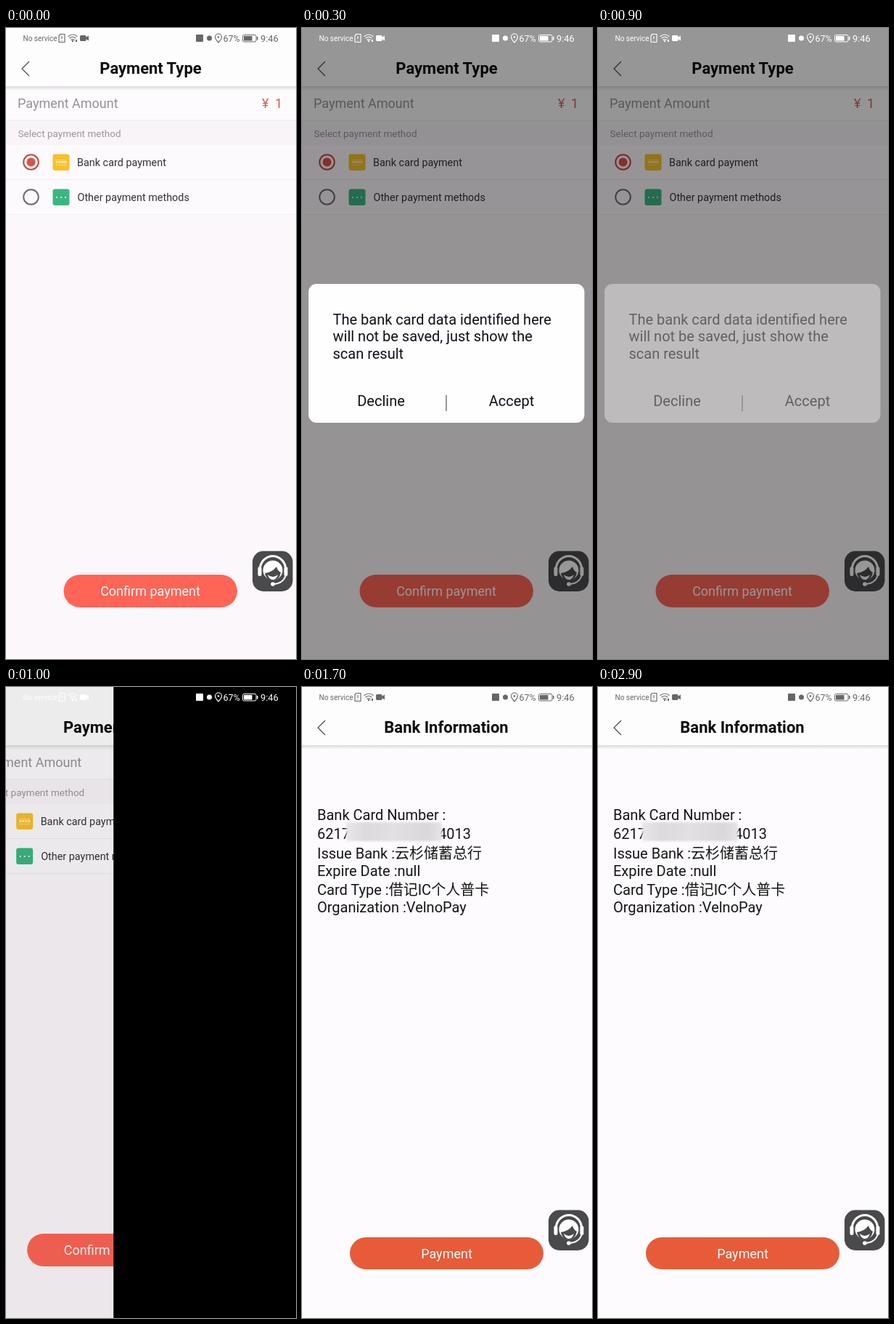
Recreate the animation shown at these times as an HTML page. Size 400 by 868 pixels, loop 3000 ms.

```html
<!DOCTYPE html>
<html lang="en">
<head>
<meta charset="utf-8">
<title>Bank card payment</title>
<style>
  html, body { margin: 0; width: 100%; height: 100%; overflow: hidden; background: #000; }
  svg { display: block; width: 100vw; height: 100vh; font-family: Roboto, "Noto Sans CJK SC", "Noto Sans CJK", sans-serif; }
  text { white-space: pre; }
  .mid { text-anchor: middle; }
  .title { font-size: 22px; font-weight: 700; fill: #0b0b0b; }
  .row { font-size: 14.4px; fill: #333135; }
  .big { font-size: 20px; fill: #111; }
  .info { font-size: 20px; fill: #151515; }
  .button { font-size: 18px; fill: #fff; }
  .line { fill: none; stroke-linecap: round; stroke-linejoin: round; }
</style>
</head>
<body>
<svg viewBox="0 0 400 868" preserveAspectRatio="none">
  <defs>
    <linearGradient id="fade" x2="0" y2="1">
      <stop offset="0" stop-color="#000" stop-opacity=".13"/>
      <stop offset="1" stop-color="#000" stop-opacity="0"/>
    </linearGradient>
    <linearGradient id="smudge">
      <stop offset="0" stop-color="#e9e7ea"/>
      <stop offset=".2" stop-color="#dbd9dc"/>
      <stop offset=".5" stop-color="#e2e0e3"/>
      <stop offset=".85" stop-color="#d9d7da"/>
      <stop offset="1" stop-color="#e6e4e7"/>
    </linearGradient>
    <filter id="soft"><feGaussianBlur stdDeviation="1.5"/></filter>
    <g id="header">
      <rect y="80" width="400" height="6" fill="url(#fade)"/>
      <rect width="400" height="80" fill="#fefdfe"/>
      <path class="line" d="M31.500 46.500L22 56L31.500 65.500" stroke="#4a4a4a" stroke-width="1.300"/>
    </g>
    <g id="support">
      <rect x="340" y="719.500" width="55.500" height="55.500" rx="15" fill="#4a494b"/>
      <path class="line" d="M350.500 744A17.500 17.500 0 0 1 385.500 744" stroke="#fff" stroke-width="3"/>
      <rect x="347.500" y="741" width="5" height="13" rx="2.500" fill="#fff"/>
      <rect x="383.500" y="741" width="5" height="13" rx="2.500" fill="#fff"/>
      <circle cx="368" cy="746" r="13.500" fill="#fff"/>
      <path d="M357 750Q367 749 373 741Q375 747 379 749Q377 760 368 760Q359 760 357 750Z" fill="#4a494b"/>
      <path d="M361 752Q368 758 375 752Q373 759 368 759Q363 759 361 752Z" fill="#fff"/>
      <path class="line" d="M385.500 754Q382 764 369 765" stroke="#fff" stroke-width="2"/>
      <circle cx="368" cy="765" r="2.800" fill="#fff"/>
    </g>
  </defs>

  <g id="payment">
    <rect width="400" height="868" fill="#fcf7fb"/>
    <rect y="80" width="400" height="47" fill="#fdfbfd"/>
    <rect y="127" width="400" height="34" fill="#f8f4f8"/>
    <rect y="161" width="400" height="95" fill="#fdfafd"/>
    <path d="M0 127H400M0 208.500H400M0 256.500H400" stroke="#efebef"/>
    <use href="#header"/>
    <text class="title mid" x="199.500" y="63">Payment Type</text>
    <text x="16" y="110" font-size="18" fill="#949295">Payment Amount</text>
    <g font-size="18" fill="#d75c4d"><text x="353" y="110">¥</text><text x="371" y="110">1</text></g>
    <text x="16.500" y="150" font-size="13.500" fill="#9a979b">Select payment method</text>
    <circle cx="34.500" cy="184.500" r="10.300" fill="none" stroke="#c4473f" stroke-width="2"/>
    <circle cx="34.500" cy="184.500" r="6" fill="#dd5047"/>
    <circle cx="34.500" cy="232.500" r="10.300" fill="none" stroke="#6d696d" stroke-width="2"/>
    <rect x="64.500" y="173.500" width="23" height="22.500" rx="3" fill="#f8c029"/>
    <path d="M68.500 181.500H83.500M68.500 188.500H83.500" stroke="#fbdc80"/>
    <path d="M68.500 184.500H83.500" stroke="#fdeab0" stroke-width="3" stroke-dasharray="3 1"/>
    <rect x="64.500" y="221.500" width="23" height="22.500" rx="3" fill="#3cb681"/>
    <path class="line" d="M70 233H82.500" stroke="#fff" stroke-width="2" stroke-dasharray="0 6"/>
    <text class="row" x="98" y="190">Bank card payment</text>
    <text class="row" x="98.500" y="238">Other payment methods</text>
    <rect x="79.500" y="752" width="239.500" height="45" rx="22.500" fill="#ff6556"/>
    <text class="button mid" x="199" y="781">Confirm payment</text>
    <use href="#support"/>
  </g>

  <rect id="dim" width="400" height="868"/>

  <g id="dialog">
    <rect x="9" y="352" width="380.500" height="191" rx="11" fill="#fefdff"/>
    <g class="big">
      <text x="42.500" y="407.500">The bank card data identified here</text>
      <text x="42.500" y="431">will not be saved, just show the</text>
      <text x="42.500" y="454.500">scan result</text>
      <text class="mid" x="109" y="520">Decline</text>
      <text class="mid" x="289" y="520">Accept</text>
    </g>
    <path d="M199 505V527" stroke="#8d8b8e" stroke-width="1.800"/>
  </g>

  <rect id="scanner" width="400" height="868"/>

  <g id="result">
    <rect width="400" height="868" fill="#fdfbfe"/>
    <use href="#header"/>
    <text class="title mid" x="199" y="63">Bank Information</text>
    <g class="info">
      <text x="21" y="183">Bank Card Number :</text>
      <text x="21" y="209">6217</text>
      <text x="188" y="209">4013</text>
      <text x="21" y="236">Issue Bank :云杉储蓄总行</text>
      <text x="21" y="260">Expire Date :null</text>
      <text x="21" y="286">Card Type :借记IC个人普卡</text>
      <text x="21" y="310">Organization :VelnoPay</text>
    </g>
    <rect x="61" y="186" width="132" height="26" fill="url(#smudge)" filter="url(#soft)"/>
    <rect x="66" y="757" width="267" height="44" rx="22" fill="#e75b39"/>
    <text class="button mid" x="199.500" y="786">Payment</text>
    <use href="#support"/>
  </g>

  <g id="status" fill="currentColor" stroke="none">
    <text x="23.500" y="17.500" font-size="10">No service</text>
    <g class="line" stroke="currentColor" stroke-width="1.150">
      <path d="M75 8.500H81V19.500H73V10.500ZM77 11.500V14.500M77 17V17.200"/>
      <path d="M86 11.500Q92 6.500 98 11.500M88 14Q92 10.500 96 14M90 16.500Q92 14.500 94 16.500"/>
      <path d="M293 20Q288.500 15 288.500 12.500A4.500 4.500 0 0 1 297.500 12.500Q297.500 15 293 20Z"/>
    </g>
    <circle cx="92" cy="18" r="1.200"/>
    <path d="M96 16H98V19H96Z"/>
    <rect x="102" y="10" width="8.500" height="8" rx="1.500"/>
    <path d="M110 13L114 10.500V17.500L110 15Z"/>
    <rect x="262" y="9" width="10" height="10" rx="1"/>
    <circle cx="280.500" cy="14" r="3.500"/>
    <circle cx="293" cy="12.500" r="1.300"/>
    <text x="299.500" y="18.500" font-size="12.500">67%</text>
    <rect x="326.500" y="9.500" width="18.500" height="9.500" rx="2" fill="none" stroke="currentColor"/>
    <rect x="328" y="11" width="11.500" height="6.500"/>
    <rect x="346" y="12" width="1.500" height="4.500"/>
    <text x="351" y="18.500" font-size="12.800">9:46</text>
  </g>

  <circle id="touch" r="12" fill="#fff" fill-opacity=".5" stroke="#aaa8ac" stroke-opacity=".7" stroke-width="1.500"/>
</svg>
<script>
const LOOP = 3000, STEP = 100, LEAD = 20;
const [payment, dim, dialog, scanner, result, status, touch] =
  ["payment", "dim", "dialog", "scanner", "result", "status", "touch"]
    .map(id => document.getElementById(id));

const ramp = (t, from, to) => Math.min(1, Math.max(0, (t - from) / (to - from)));
const pulse = (t, inA, inB, outA, outB) => ramp(t, inA, inB) * (1 - ramp(t, outA, outB));
const show = (el, on) => el.setAttribute("visibility", on ? "visible" : "hidden");
const moveTo = (el, x, y = 0) => el.setAttribute("transform", `translate(${x} ${y})`);

function draw(t) {
  const remaining = (1 - ramp(t, 900, 1300)) ** 3.45;
  moveTo(payment, -80 * (1 - remaining));
  moveTo(scanner, 400 * remaining);
  dim.setAttribute("opacity", 0.61 * pulse(t, 90, 405, 840, 1020));
  dialog.setAttribute("opacity", pulse(t, 110, 230, 820, 950));
  show(result, t >= 1700);
  status.setAttribute("color", t >= 150 && t < 1700 ? "#fff" : "#68666a");

  const second = t >= 600;
  moveTo(touch, second ? 314 : 258, second ? 510 : 779);
  touch.setAttribute("opacity", second ? pulse(t, 620, 700, 820, 900) : pulse(t, 20, 100, 100, 300));
}

function tick() {
  draw(Math.floor((performance.now() + LEAD) / STEP) * STEP % LOOP);
  requestAnimationFrame(tick);
}
tick();
</script>
</body>
</html>
```
